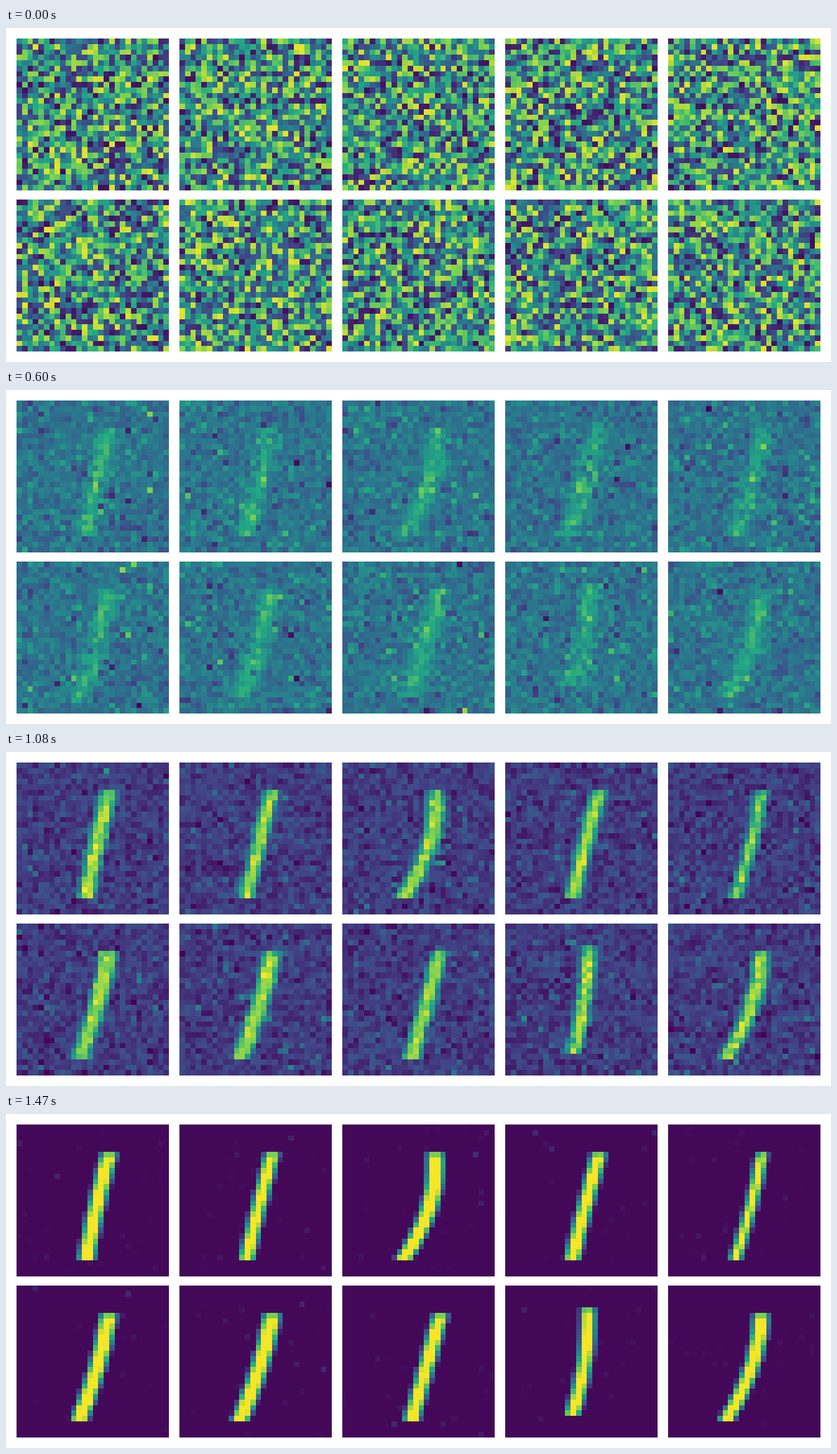
Animation, 1175 px wide and 477 px high, one loop 1500 ms. Source, as an HTML page with a canvas:

```html
<!DOCTYPE html>
<html lang="en">
<head>
<meta charset="utf-8">
<title>Denoising digits</title>
<style>
html, body { margin: 0; width: 100%; height: 100%; overflow: hidden; background: #fff; }
canvas { display: block; }
</style>
</head>
<body>
<canvas id="stage" width="1175" height="477"></canvas>
<script>
const ctx = document.getElementById('stage').getContext('2d');
const N = 28, CELL = 7.75, STEPS = 50, STEP_MS = 30, ROWS = 19;

// Half width, then the centre at the top, middle and bottom
const strokes = [
  { half: 1.35, xs: [17, 14.7, 12.9] },
  { half: 1.2, xs: [17, 14.6, 12.4] },
  { half: 1.4, xs: [17.1, 16, 11.4] },
  { half: 1.25, xs: [17.2, 14.7, 12.4] },
  { half: 0.95, xs: [17.2, 15.2, 12.4] },
  { half: 1.4, xs: [16.9, 14.8, 11.6] },
  { half: 1.45, xs: [17, 14.7, 11.2] },
  { half: 1.3, xs: [18, 15.4, 12.8] },
  { half: 1.2, xs: [15.2, 14.6, 12.4], top: 4 },
  { half: 1.3, xs: [17.1, 15.3, 10.8] }
];

const clamp = v => Math.min(1, Math.max(0, v));
const lerp = (a, b, f) => a + (b - a) * f;

let seed = 20231;
function rand() {
  seed = (seed + 0x6D2B79F5) | 0;
  let r = Math.imul(seed ^ (seed >>> 15), 1 | seed);
  r = (r + Math.imul(r ^ (r >>> 7), 61 | r)) ^ r;
  return ((r ^ (r >>> 14)) >>> 0) / 4294967296;
}
const gauss = () => Math.sqrt(-2 * Math.log(1 - rand())) * Math.cos(2 * Math.PI * rand());

// Viridis lookup
const stops = ['440154', '414487', '2a788e', '22a884', '7ad151', 'fde725']
  .map(h => [0, 2, 4].map(i => parseInt(h.slice(i, i + 2), 16)));
const palette = Array.from({ length: 256 }, (_, i) => {
  const p = i / 255 * (stops.length - 1), s = Math.min(stops.length - 2, Math.floor(p));
  return `rgb(${stops[s].map((c, j) => Math.round(lerp(c, stops[s + 1][j], p - s)))})`;
});

// Noise starts uniform and is gradually replaced by Gaussian noise.
const KEEP = 0.85, FRESH = Math.sqrt(1 - KEEP * KEEP);
const noise = [Float32Array.from({ length: strokes.length * N * N }, () => (rand() - 0.5) * Math.sqrt(12))];
for (let k = 1; k < STEPS; k++) noise.push(noise[k - 1].map(z => KEEP * z + FRESH * gauss()));

// Stroke strength at a cell, along a parabola through the three centres
function ink({ half, xs: [a, mid, b], top = 5 }, col, row, soft) {
  const f = (row - top) / ROWS;
  if (f < 0 || f > 1) return 0;
  const centre = lerp(a, b, f) + (mid - (a + b) / 2) * 4 * f * (1 - f);
  const dist = Math.abs(col + 0.5 - centre) * 0.96;
  return clamp((half - dist) / soft + 0.5) * (row === top ? 0.8 : 1);
}

function draw(k) {
  const haze = Math.cos(Math.PI / 2 * k / (STEPS - 1)) ** 1.25;
  const burst = Math.exp(-k / 3);
  const mean = 0.02 + 0.48 * haze;
  const spread = Math.min(0.08, 0.11 * Math.sqrt(haze)) + 0.19 * burst;
  const tail = 0.07 * haze * (1 - burst);
  const amp = 0.97 * (1 - haze) ** 0.9;
  const soft = 1.3 + 2.7 * haze * haze;

  ctx.clearRect(0, 0, 1175, 477);
  strokes.forEach((stroke, p) => {
    const left = 15 + p % 5 * 232, top = p < 5 ? 15 : 245;
    for (let row = 0; row < N; row++) {
      const y = Math.round(top + row * CELL), h = Math.round(top + (row + 1) * CELL) - y;
      for (let col = 0; col < N; col++) {
        const x = Math.round(left + col * CELL), w = Math.round(left + (col + 1) * CELL) - x;
        const z = noise[k][(p * N + row) * N + col];
        const grain = spread * z * (1 - 3 * tail + tail * z * z);
        const speck = 0.06 * Math.max(0, z - 1.9) * (1 - haze);
        const v = clamp(mean + amp * ink(stroke, col, row, soft) + grain + speck);
        ctx.fillStyle = palette[Math.round(v * 255)];
        ctx.fillRect(x, y, w, h);
      }
    }
  });
}

const start = performance.now();
let shown = -1;
function tick() {
  const k = Math.floor((performance.now() - start) / STEP_MS) % STEPS;
  if (k !== shown) draw(shown = k);
  requestAnimationFrame(tick);
}
tick();
</script>
</body>
</html>
```
